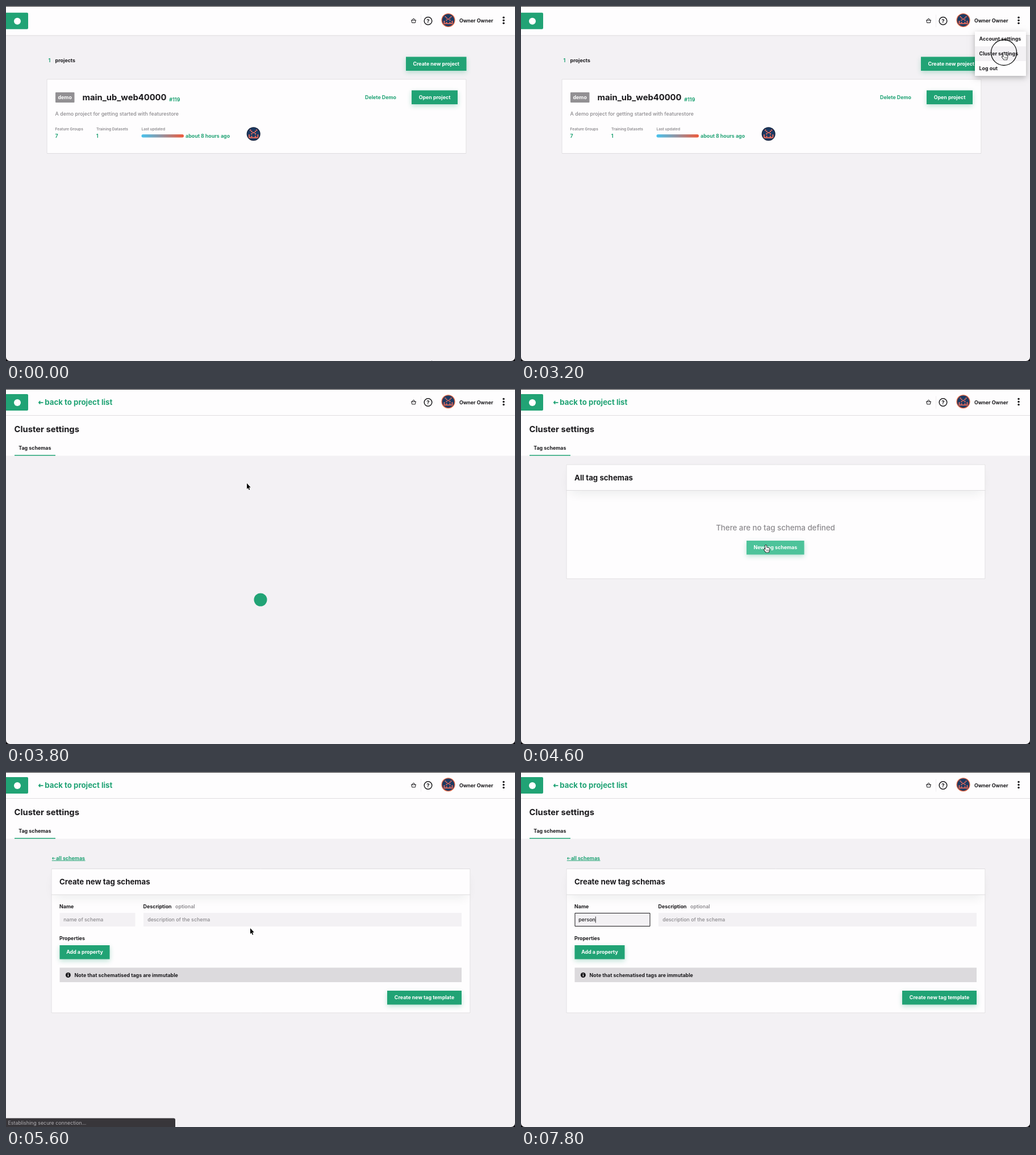
Write an HTML page with a canvas that moves like this. It is 896 px wide and 625 px high and loops after 8000 ms.

```html
<!DOCTYPE html>
<html lang="en">
<head>
<meta charset="utf-8">
<title>Cluster settings</title>
<style>
html, body { margin: 0; width: 100%; height: 100%; overflow: hidden; background: #f3f1f4; }
canvas { display: block; width: 896px; height: 625px; }
</style>
</head>
<body>
<canvas id="stage"></canvas>
<script>
const W = 896, H = 625, LOOP = 8000, STEP = 200;
const UNIT = 0.738; // page zoom
const GREEN = '#21a375', INK = '#1b1a1d', GRAY = '#8b898d', PAPER = '#f3f1f4',
      WHITE = '#fefdfe', LINE = '#dfdde0', NAVY = '#1b3a63', CORAL = '#ee6c5c';
const canvas = document.getElementById('stage');
const ctx = canvas.getContext('2d');
const dpr = window.devicePixelRatio || 1;
canvas.width = W * dpr;
canvas.height = H * dpr;

function rect(x, y, w, h, fill, r = 0) {
  ctx.fillStyle = fill;
  ctx.beginPath();
  ctx.roundRect(x, y, w, h, r);
  ctx.fill();
}

function disc(x, y, r, fill) {
  ctx.fillStyle = fill;
  ctx.beginPath();
  ctx.arc(x, y, r, 0, Math.PI * 2);
  ctx.fill();
}

function ring(x, y, r, width, color) {
  ctx.strokeStyle = color;
  ctx.lineWidth = width;
  ctx.beginPath();
  ctx.arc(x, y, r, 0, Math.PI * 2);
  ctx.stroke();
}

function frame(x, y, w, h, color) {
  ctx.strokeStyle = color;
  ctx.lineWidth = 1;
  ctx.strokeRect(x + 0.5, y + 0.5, w - 1, h - 1);
}

// y is the middle of the capitals, size is in page pixels
function text(str, x, y, { size = 12, weight = 700, color = INK, align = 'left' } = {}) {
  const px = size * UNIT;
  ctx.font = `${weight} ${px}px Inter, sans-serif`;
  ctx.fillStyle = color;
  ctx.textAlign = align;
  ctx.fillText(str, x, y + px * 0.36);
}

function shadowed(color, blur, dy, draw) {
  ctx.save();
  ctx.shadowColor = color;
  ctx.shadowBlur = blur * dpr;
  ctx.shadowOffsetY = dy * dpr;
  draw();
  ctx.restore();
}

function button(label, x, y, w, fill = GREEN) {
  shadowed('rgba(33,163,117,0.3)', 9, 3, () => rect(x, y, w, 24.5, fill));
  text(label, x + w / 2, y + 12.3, { color: '#fff', align: 'center' });
}

function backArrow(x, y, len, width) {
  const head = len * 0.32;
  ctx.strokeStyle = GREEN;
  ctx.lineWidth = width;
  ctx.beginPath();
  ctx.moveTo(x + len, y);
  ctx.lineTo(x + 0.8, y);
  ctx.moveTo(x + head + 0.6, y - head);
  ctx.lineTo(x + 0.8, y);
  ctx.lineTo(x + head + 0.6, y + head);
  ctx.stroke();
}

const FACE = ['.X....X.', '..X..X..', '...XX...', '..X..X..', 'X......X', 'X.X..X.X', 'XXXXXXXX'];

function avatar(x, y, rim, cell) {
  disc(x, y, 12, rim);
  disc(x, y, 10.7, NAVY);
  ctx.save();
  ctx.beginPath();
  ctx.arc(x, y, 10.7, 0, Math.PI * 2);
  ctx.clip();
  FACE.forEach((row, j) => [...row].forEach((c, i) => {
    if (c === 'X') rect(x + (i - 4) * cell, y + (j - 3.5) * cell, cell, cell, CORAL);
  }));
  ctx.restore();
}

function basket(x, y) {
  ctx.strokeStyle = INK;
  ctx.lineWidth = 1;
  ctx.beginPath();
  ctx.moveTo(x - 4.5, y - 1);
  ctx.lineTo(x + 4.5, y - 1);
  ctx.moveTo(x - 3.7, y - 1);
  ctx.lineTo(x - 2.8, y + 3.5);
  ctx.lineTo(x + 2.8, y + 3.5);
  ctx.lineTo(x + 3.7, y - 1);
  ctx.moveTo(x - 2.4, y - 1);
  ctx.lineTo(x - 1, y - 3.6);
  ctx.lineTo(x + 1, y - 3.6);
  ctx.lineTo(x + 2.4, y - 1);
  ctx.stroke();
}

function header(height) {
  const mid = height / 2 + 0.5;
  rect(0, 0, W, height, WHITE);
  rect(0, height, W, 1, LINE);
  rect(0, mid - 14.5, 39, 29, GREEN, [0, 2, 2, 0]);
  disc(20, mid + 0.5, 6, '#fff');
  basket(717.5, mid - 0.2);
  rect(730, mid - 11, 1, 22, '#efedf0');
  ring(743, mid, 6.8, 1.5, INK);
  text('?', 743, mid, { size: 13, align: 'center' });
  avatar(778.5, mid - 1.2, '#e2623f', 2);
  text('Owner Owner', 798, mid, {});
  for (const d of [-5, 0, 5]) disc(876, mid - 1 + d, 1.75, INK);
}

function projectList() {
  header(51.5);
  text('1', 74.5, 95.5, { color: GREEN });
  text('projects', 86.6, 95.5);
  button('Create new project', 704, 89.5, 106.5);

  rect(71.5, 128.5, 739, 131.5, WHITE);
  frame(71.5, 128.5, 739, 131.5, LINE);
  rect(87, 152, 33.5, 18, '#929093', 1);
  text('demo', 103.7, 161, { color: '#fff', align: 'center' });
  text('main_ub_web40000', 134.6, 161, { size: 20 });
  text('#119', 287.3, 164.5, { color: GREEN });
  text('Delete Demo', 632, 161, { color: GREEN });
  button('Open project', 714, 148.5, 81);
  text('A demo project for getting started with featurestore', 86.6, 189.8, { weight: 500, color: GRAY });

  const label = { size: 9, weight: 600, color: GRAY };
  text('Feature Groups', 86.6, 217, label);
  text('Training Datasets', 159, 217, label);
  text('Last updated', 238.4, 217, label);
  text('7', 86.6, 229, { color: GREEN });
  text('1', 158.8, 229, { color: GREEN });
  const bar = ctx.createLinearGradient(238.5, 0, 313, 0);
  bar.addColorStop(0, '#47c3ee');
  bar.addColorStop(0.5, '#98909c');
  bar.addColorStop(1, '#f0593a');
  rect(238.5, 226, 74.5, 5.5, bar, 2.7);
  text('about 8 hours ago', 316, 229, { color: GREEN });
  avatar(435.7, 225.2, '#14223d', 2.2);
}

function menu(hover) {
  shadowed('rgba(0,0,0,0.28)', 10, 3, () => rect(799, 45, 90, 78, WHITE));
  if (hover >= 0) rect(799, 45 + hover * 26, 90, 26, PAPER);
  ['Account settings', 'Cluster settings', 'Log out'].forEach((s, i) => text(s, 806.6, 58.3 + i * 26));
}

function settingsTop() {
  rect(0, 0, W, 117.5, WHITE);
  header(46);
  backArrow(57, 23.8, 8.5, 1.7);
  text('back to project list', 68.2, 23.5, { size: 18, color: GREEN });
  text('Cluster settings', 14.6, 70.5, { size: 20 });
  text('Tag schemas', 22.2, 103.5);
  rect(15, 116, 72, 1.6, GREEN);
}

function card(title, y, h) {
  rect(79.5, y, 738, h, WHITE);
  shadowed('rgba(20,40,35,0.09)', 20, 10, () => rect(87, y + 4, 723, 36, WHITE));
  rect(79.5, y, 738, 46, WHITE);
  frame(79.5, y, 738, h, LINE);
  rect(79.5, y + 45.5, 738, 1, LINE);
  text(title, 94, y + 23.5, { size: 18 });
}

function emptyList(hover) {
  card('All tag schemas', 132.5, 202);
  text('There are no tag schema defined', 448, 244.5, { size: 18, weight: 500, color: GRAY, align: 'center' });
  button('New tag schemas', 397, 267, 101.5, hover ? '#4dc39a' : GREEN);
}

function schemaForm(t) {
  const focused = t >= 6400;
  const typed = 'person'.slice(0, Math.max(0, (t - 6400) / STEP));
  backArrow(80.8, 152, 5.8, 1.1);
  text('all schemas', 87.9, 151.5, { color: GREEN });
  rect(80.8, 155.6, 58.7, 0.9, GREEN);
  card('Create new tag schemas', 170, 254.5);

  text('Name', 94, 237.3);
  text('Description', 241.6, 237.3);
  text('optional', 298, 237.3, { weight: 600, color: GRAY });
  rect(94.5, 248, 133, 24, PAPER);
  rect(242, 248, 560, 24, PAPER);
  const hint = { weight: 500, color: GRAY };
  if (focused) frame(94.5, 248, 133, 24, INK);
  if (typed) text(typed, 101.3, 260, { weight: 500 });
  else text('name of schema', 101.3, 260, hint);
  if (focused) {
    const caret = typed ? 101.3 + ctx.measureText(typed).width : 101.3;
    rect(caret, 254.5, 0.9, 11, INK);
  }
  text('description of the schema', 249.2, 260, hint);

  text('Properties', 94, 292.5);
  button('Add a property', 94.5, 305, 88);
  rect(94.5, 344.5, 707.5, 25.5, '#dcdadd');
  disc(109.4, 357.5, 4.5, INK);
  rect(108.8, 356.8, 1.3, 3.2, '#fff');
  rect(108.8, 354.7, 1.3, 1.3, '#fff');
  text('Note that schematised tags are immutable', 120.6, 357.5);
  button('Create new tag template', 671, 385, 131);
}

function shape(x, y, points, fill, stroke, width) {
  ctx.beginPath();
  points.forEach(([px, py]) => ctx.lineTo(x + px, y + py));
  ctx.closePath();
  ctx.lineJoin = 'round';
  ctx.strokeStyle = stroke;
  ctx.lineWidth = width;
  ctx.stroke();
  ctx.fillStyle = fill;
  ctx.fill();
}

const ARROW = [[0, 0], [0, 10], [2.2, 8], [3.8, 11.8], [5.3, 11.1], [3.7, 7.4], [6.7, 7.2]];
const HAND = [[-1, 0.6], [0, 0], [1, 0.6], [1.3, 4], [5.8, 5.2], [6.5, 6.5], [6, 9.5], [5, 12.5],
              [0.3, 12.5], [-3.3, 7.8], [-2.8, 6.8], [-0.6, 8]];

const pointer = {
  arrow: (x, y) => shape(x, y, ARROW, '#000', '#fff', 1.4),
  hand(x, y) {
    shape(x, y, HAND, '#fff', '#111', 1.7);
    for (const d of [1.2, 2.7, 4.2]) rect(x + d, y + 7.5, 0.6, 3, '#333');
  },
  beam(x, y) {
    rect(x - 0.5, y - 5.5, 1, 11, INK);
    rect(x - 2, y - 6, 4, 1, INK);
    rect(x - 2, y + 5, 4, 1, INK);
  }
};

// time, x, y
const PATH = [
  [0, 749, 624], [200, 752, 592], [400, 776, 455], [600, 815, 270], [800, 850, 120], [1000, 872, 46],
  [1200, 877, 26], [2200, 877, 27], [2400, 874, 38], [2600, 866, 57], [2800, 855, 75], [3000, 850, 82],
  [3200, 850, 82], [3400, 800, 94], [3600, 590, 132], [3800, 424, 166], [4000, 421, 236], [4200, 431, 275],
  [5400, 431, 275], [5600, 430, 275], [5800, 400, 272], [6000, 260, 264], [6200, 165, 260], [6400, 165, 260]
];

function pointerAt(t) {
  const i = PATH.findIndex(p => p[0] >= t);
  if (i < 0) return null;
  const b = PATH[i], a = PATH[Math.max(0, i - 1)];
  const k = b[0] === a[0] ? 1 : (t - a[0]) / (b[0] - a[0]);
  return [a[1] + (b[1] - a[1]) * k, a[2] + (b[2] - a[2]) * k];
}

const within = (t, from, to) => t >= from && t < to;

function pointerKind(t) {
  if (within(t, 1200, 3400) || within(t, 4200, 5600)) return 'hand';
  return t >= 6200 ? 'beam' : 'arrow';
}

function drawPointer(t) {
  const p = pointerAt(t);
  if (!p) return;
  const pressed = within(t, 1800, 2200) || t === 3200 || t === 5400 || t === 6200;
  if (pressed) ring(p[0], p[1], 22.5, 1.3, '#111');
  pointer[pointerKind(t)](...p);
}

function windowEdge() {
  rect(0, 0, W, 1, '#2b292c');
  ctx.fillStyle = '#0d0b0e';
  ctx.beginPath();
  ctx.rect(0, H - 12, W, 12);
  ctx.roundRect(0, H - 40, W, 40, [0, 0, 7, 7]);
  ctx.save();
  ctx.clip('evenodd');
  ctx.fillRect(0, H - 12, W, 12);
  ctx.restore();
}

function draw(t) {
  ctx.setTransform(dpr, 0, 0, dpr, 0, 0);
  rect(0, 0, W, H, PAPER);
  if (t < 3400) {
    projectList();
    if (t >= 2000) menu(t < 2600 ? -1 : t < 2800 ? 0 : 1);
  } else {
    settingsTop();
    if (t < 4000) disc(448, 371, 11.5, GREEN);
    else if (t < 5600) emptyList(t >= 4200);
    else schemaForm(t);
  }
  windowEdge();
  if (within(t, 5600, 6200)) {
    rect(0, 609.5, 298, 15.5, '#38363a', [0, 3, 0, 0]);
    text('Establishing secure connection...', 3.5, 617.6, { weight: 400, color: '#b1afb3' });
  }
  drawPointer(t);
}

const start = performance.now();
function tick() {
  const t = (performance.now() - start) % LOOP;
  draw(Math.floor(t / STEP) * STEP);
  requestAnimationFrame(tick);
}
tick();
</script>
</body>
</html>
```
